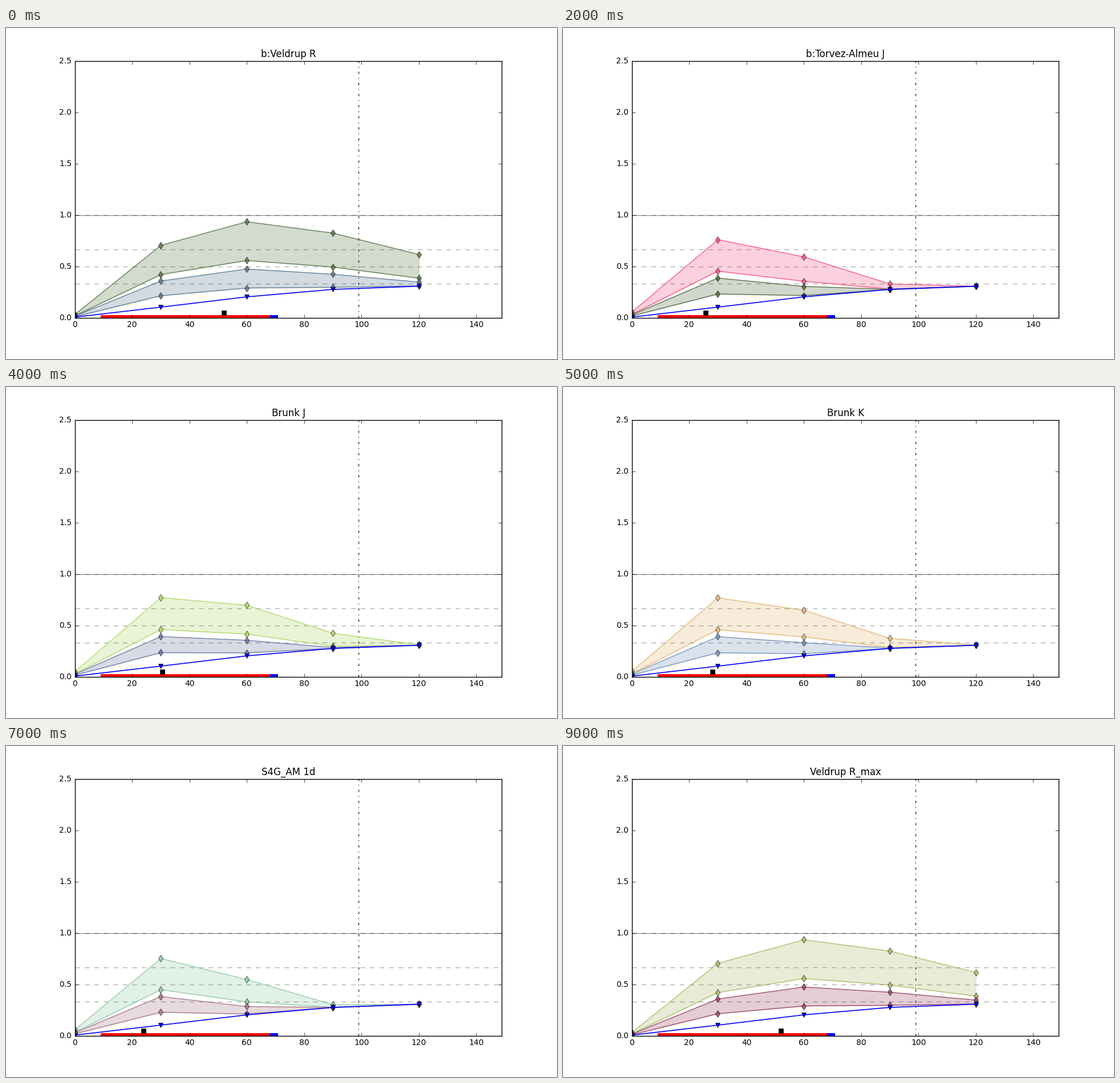
Write a matplotlib script that moves like this. It is 966 px wide and 580 px high and loops after 10 s.

```python
import numpy as np
import matplotlib.pyplot as plt
from matplotlib.animation import FuncAnimation

plt.style.use("classic")
plt.rcParams.update({
    "font.family": "DejaVu Sans",
    "font.size": 10,
    "figure.facecolor": "white",
    "savefig.facecolor": "white",
    "savefig.dpi": "figure",
})

DPI = 100
X = np.arange(0, 121, 30)
FLOOR = np.maximum(0.307 * np.sin(np.pi * X / 250) ** 1.1, 0.005)
RATIOS = (1, 0.596, 0.507, 0.303)   # outer top, outer low, inner top, inner low
WEIGHTS = (0.7, 0.3)                # share of each disk, main one first

# Title, outer colour, inner colour, disk radii
SCENES = [
    ("b:Veldrup R", "#507341", "#53738b", [52]),
    ("b:Veldrup B", "#9bfbff", "#3b8bef", [57.5]),
    ("b:Torvez-Almeu J", "#f54b7b", "#4b6337", [25.8]),
    ("b:Torvez-Almeu H", "#c89bd2", "#5a8c82", [27]),
    ("Brunk J", "#abd75f", "#676f9f", [30.5]),
    ("Brunk K", "#e1b46e", "#6e8cb4", [28.2]),
    ("Brunk H", "#5fc7f7", "#abb383", [26]),
    ("S4G_AM 1d", "#8cc8a0", "#a06e82", [24]),
    ("S4G_AM 2d", "#db9f53", "#37679b", [11.7, 47]),
    ("Veldrup R_max", "#a7b75f", "#973b5b", [52]),
]

fig = plt.figure(figsize=(966 / DPI, 580 / DPI), dpi=DPI)
ax = fig.add_axes([0.125, 0.125, 0.775, 0.775])


def disk(radius):
    """Rise to a peak just outside the radius, then an exponential fall."""
    u = np.maximum(X, 2.1) / (radius + 8.7)
    return 0.771 * (radius / 25.8) ** 0.275 * (u * np.exp(1 - u)) ** 1.42


def curves(radii):
    """Scaled disk profiles, each blended into the floor by a soft maximum."""
    total = np.average([disk(r) for r in radii], axis=0,
                       weights=WEIGHTS[:len(radii)])
    return [((k * total) ** 6 + FLOOR ** 6) ** (1 / 6) for k in RATIOS]


def band(top, low, color):
    ax.fill_between(X, low, top, color=color, alpha=0.25)
    for y in (top, low):
        ax.plot(X, y, "d-", color=color, alpha=0.8)


def guides():
    for y in (1 / 3, 1 / 2, 2 / 3, 1):
        ax.axhline(y, color="k", ls="--", alpha=0.3)
    ax.axhline(1, color="k", alpha=0.4)
    ax.axvline(99, color="k", ls="-.", alpha=0.85)
    for start, end, color in ((9, 68.1, "red"), (68.1, 70.9, "blue")):
        ax.plot([start, end], [0, 0], color=color, lw=7, solid_capstyle="butt")


def draw(i):
    title, outer, inner, radii = SCENES[i]
    top, low, inner_top, inner_low = curves(radii)
    ax.cla()
    guides()
    band(top, low, outer)
    band(inner_top, inner_low, inner)
    ax.plot(X, FLOOR, "v-", color="blue", lw=1.2)
    ax.plot(radii, [0.05] * len(radii), "ks")
    ax.set_xlim(0, 149)
    ax.set_ylim(0, 2.5)
    ax.set_xticks(range(0, 141, 20))
    ax.set_yticks(np.arange(0, 2.6, 0.5))
    ax.set_title(title)
    return []


anim = FuncAnimation(fig, draw, frames=len(SCENES), interval=1000,
                     repeat=True, repeat_delay=0)
plt.show()
```
